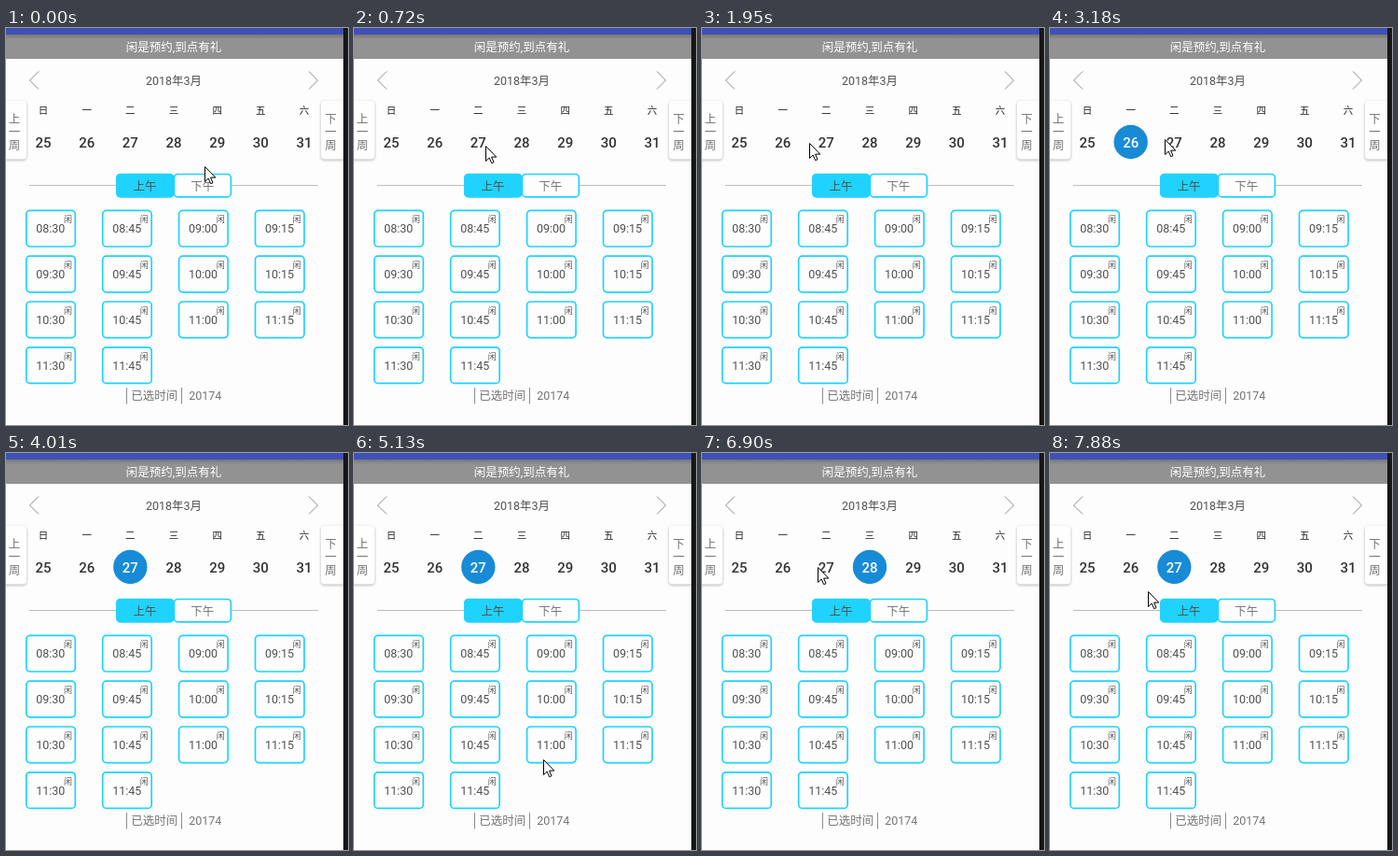
Write an HTML page that moves like this. It is 367 px wide and 425 px high and loops after 8 s.

```html
<!DOCTYPE html>
<html lang="zh-CN">
<head>
<meta charset="utf-8">
<title>预约</title>
<style>
html, body { margin: 0; width: 100%; height: 100%; overflow: hidden; background: #fdfdfd; }
svg { display: block; width: 367px; height: 425px; }
text { font-family: Roboto, "Noto Sans CJK SC", "Noto Sans CJK", sans-serif; font-size: 12.5px; text-anchor: middle; fill: #757575; }
.title { fill: #fff; }
.month, .slot { fill: #505050; }
.week { font-size: 10.5px; fill: #222; }
.date { font-size: 15px; font-weight: 500; fill: #333; }
.date.on { fill: #fff; }
.free { font-size: 9px; fill: #555; }
.thin { fill: none; stroke: #8c8c8c; }
.rule { fill: none; stroke: #bdbdbd; }
.box { fill: #fdfdfd; stroke: #1fd3fe; stroke-width: 1.7; }
.box.full { fill: #1fd3fe; }
.card { fill: #fefefe; filter: drop-shadow(0 1px 1.5px rgba(0, 0, 0, .3)); }
</style>
</head>
<body>
<svg viewBox="0 0 367 425">
  <defs>
    <linearGradient id="shade" x1="0" y1="0" x2="0" y2="1">
      <stop offset="0" stop-color="#777"/>
      <stop offset=".2" stop-color="#929292"/>
    </linearGradient>
  </defs>
  <rect width="367" height="425" fill="#fdfdfd"/>
  <rect y="7" width="362" height="26" fill="url(#shade)"/>
  <rect width="362" height="7" fill="#3f51b5"/>
  <path class="thin" d="M35 46.5L25.5 56L35 65.5M325 46.5L334.5 56L325 65.5"/>
  <g id="labels"></g>
  <circle id="mark" cy="122" r="18.2" fill="#188bd6"/>
  <g id="dates"></g>
  <rect class="card" x="-6" y="78" width="28" height="62.5" rx="4"/>
  <rect class="card" x="338" y="78" width="30" height="62.5" rx="4"/>
  <g id="sides"></g>
  <path class="rule" d="M25 168.5H118M242 168.5H335"/>
  <rect class="box full" x="118.8" y="156.5" width="61" height="24.4" rx="4"/>
  <rect class="box" x="180.4" y="156.5" width="61" height="24.4" rx="4"/>
  <g id="slots"></g>
  <path class="thin" d="M129.5 385V402.5M188.5 385V402.5"/>
  <rect x="362" width="5" height="425" fill="#17171a"/>
  <path id="cursor" d="M.5 .5V16.5L4.2 13L6.7 18.7L9 17.7L6.6 12.1H11.8Z" fill="#fff" stroke="#000"/>
</svg>
<script>
const NS = 'http://www.w3.org/2000/svg';
const LOOP = 8000;
const $ = id => document.getElementById(id);

function add(parent, tag, attrs, text = '') {
  const el = document.createElementNS(NS, tag);
  for (const k in attrs) el.setAttribute(k, attrs[k]);
  el.textContent = text;
  return $(parent).appendChild(el);
}
const label = (parent, cls, x, y, text) => add(parent, 'text', { class: cls, x, y }, text);
const column = i => 40 + i * 46.67;
const pad = n => String(n).padStart(2, '0');

label('labels', 'title', 180, 24.7, '闲是预约,到点有礼');
label('labels', 'month', 180, 60.8, '2018年3月');
[...'日一二三四五六'].forEach((d, i) => label('labels', 'week', column(i), 92, d));
const days = Array.from({ length: 8 }, (_, i) =>
  label('dates', 'date', column(i), 128.4, (24 + i) % 31 + 1));

[['上一周', 9], ['下一周', 348.5]].forEach(([word, x]) =>
  [...word].forEach((c, i) => label('sides', '', x, 101.6 + i * 14.2, c)));

label('slots', 'slot', 149, 173.5, '上午');
label('slots', '', 210.7, 173.5, '下午');
for (let i = 0; i < 14; i++) {
  const x = 21.8 + i % 4 * 81.9, y = 195.4 + Math.floor(i / 4) * 48.8;
  const min = 8.5 * 60 + i * 15;
  add('slots', 'rect', { class: 'box', x, y, width: 52.5, height: 38.6, rx: 4 });
  label('slots', 'slot', x + 26, y + 23.8, pad(Math.floor(min / 60)) + ':' + pad(min % 60));
  label('slots', 'free', x + 44.6, y + 12.9, '闲');
}
label('slots', '', 159.2, 398.4, '已选时间');
label('slots', '', 213.7, 398.4, '20174');

// Pointer moves: start, end, number of poses, then the path
const moves = [
  [0, 1030, 8, [213, 148], [184, 200], [124, 97], [119, 116]],
  [1180, 1330, 2, [80, 117], [67, 117]],
  [1450, 1830, 4, [68, 118], [118, 122]],
  [1950, 2380, 4, [115, 123], [86, 122]],
  [2900, 3180, 3, [97, 121], [123, 119]],
  [3720, 4010, 3, [145, 215], [176, 403], [180, 440]],
  [5130, 5860, 6, [203, 328], [169, 112], [187, 123]],
  [6660, 6900, 3, [168, 131], [124, 122]],
  [7610, 7880, 3, [118, 130], [105, 148]]
];
// Picked day: time, column
const picks = [[0, -1], [2760, 1], [3580, 2], [6260, 3], [7330, 2]];
const latest = (list, t) => list.filter(s => s[0] <= t).pop();

function pointer(t) {
  const [start, end, poses, ...path] = latest(moves, t);
  const last = poses - 1;
  const pose = Math.min(last, Math.floor((t - start) / (end - start) * last + 1e-6));
  const p = pose / last * (path.length - 1);
  const i = Math.min(Math.floor(p), path.length - 2);
  return [0, 1].map(k => Math.round(path[i][k] + (path[i + 1][k] - path[i][k]) * (p - i)));
}

function draw(t) {
  const [x, y] = pointer(t);
  const pick = latest(picks, t)[1];
  const dragging = t >= 1180 && t < 1950;
  const shift = dragging ? Math.min(0, x - 117.5) : 0;
  $('cursor').setAttribute('transform', `translate(${x} ${y})`);
  $('dates').setAttribute('transform', `translate(${shift} 0)`);
  $('mark').setAttribute('cx', pick < 0 ? -50 : column(pick));
  days.forEach((el, i) => el.classList.toggle('on', i === pick));
}

const begin = performance.now();
function tick() {
  draw((performance.now() - begin) % LOOP);
  requestAnimationFrame(tick);
}
tick();
</script>
</body>
</html>
```
